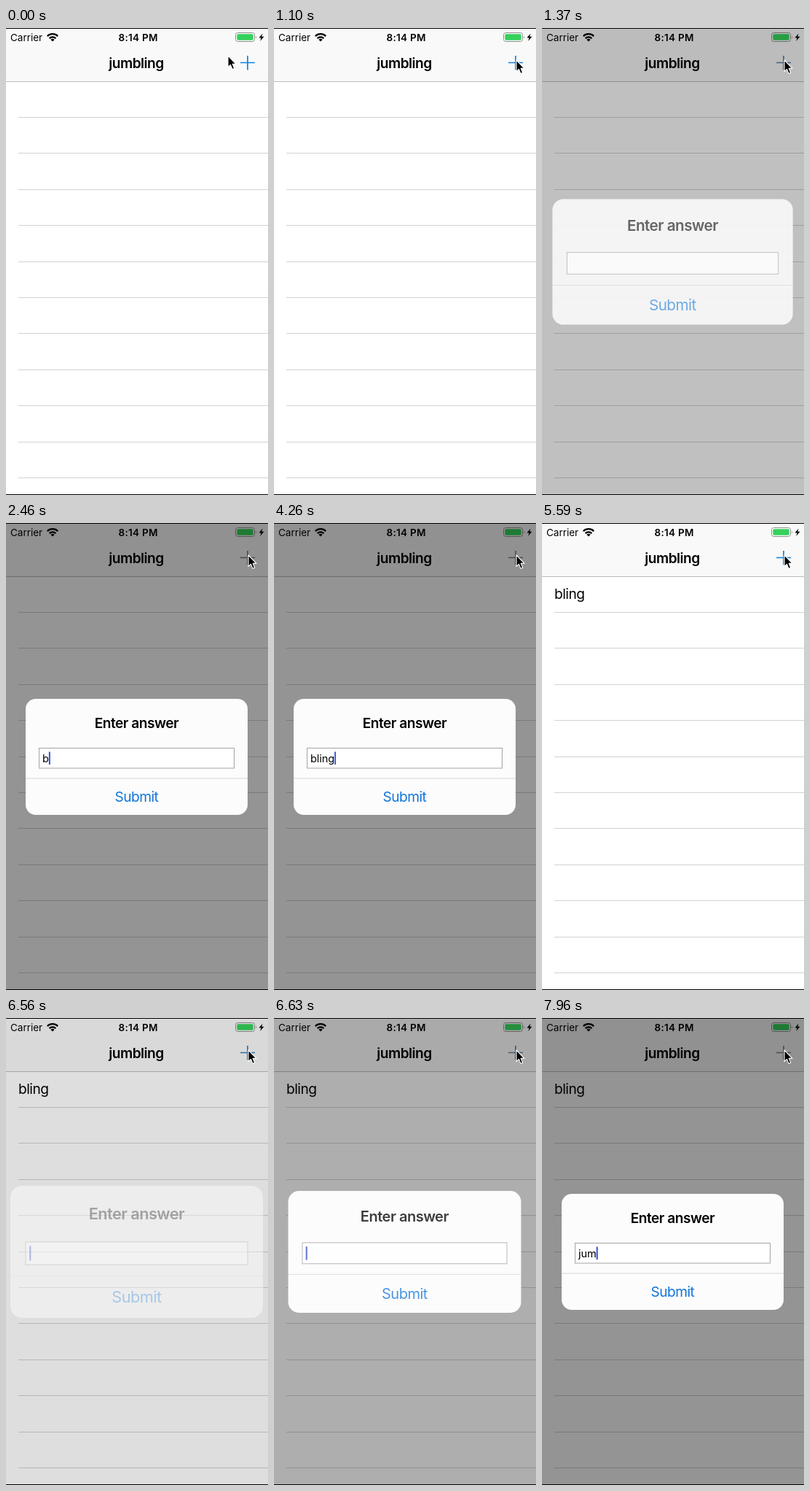
These frames come from a looping animation (360x640 px, 7990 ms). An HTML page:

```html
<!DOCTYPE html>
<html lang="en">
<head>
<meta charset="utf-8">
<title>jumbling</title>
<style>
  html, body { margin: 0; width: 100%; height: 100%; overflow: hidden; background: #fff; }
  svg { display: block; width: 100vw; height: 100vh; }
  text { font-family: Inter, "Open Sans", sans-serif; white-space: pre; }
  .small { font-size: 13.5px; }
  .body { font-size: 19.1px; letter-spacing: -.48px; }
  .bold { font-weight: 600; }
  .mid { text-anchor: middle; }
  .field { font-size: 14.6px; letter-spacing: -.1px; }
</style>
</head>
<body>
<svg viewBox="0 0 360 640">
  <rect width="360" height="640" fill="#fff"/>
  <g id="table">
    <g id="lines" fill="#d2d2d4"></g>
    <text id="row" class="body" x="17" y="104">bling</text>
  </g>

  <rect width="360" height="73" fill="#f9f9f9"/>
  <rect y="73" width="360" height="1" fill="#bcbcbc"/>
  <text class="small" x="6" y="17.5">Carrier</text>
  <g fill="none" stroke="#000" stroke-width="2.2">
    <path d="M56.8 11.2A10.2 10.2 0 0 1 71.2 11.2"/>
    <path d="M59.6 14.2A6.2 6.2 0 0 1 68.4 14.2"/>
    <path d="M64 18.6L61.4 16A3.7 3.7 0 0 1 66.6 16Z" fill="#000" stroke="none"/>
  </g>
  <text class="small bold mid" x="181.7" y="17.5" letter-spacing=".3">8:14 PM</text>
  <rect x="315.5" y="6.5" width="26" height="12" rx="3" fill="#fff" stroke="#8e8e8e"/>
  <rect x="317.3" y="8.3" width="22.4" height="8.4" rx="1.6" fill="#35d15a"/>
  <path d="M343 10.5Q344.8 12.5 343 14.5Z" fill="#8e8e8e"/>
  <path d="M352.6 7.5L347.5 13.4H350.6L349.2 18L354.5 11.7H351.3Z"/>
  <text class="body bold mid" x="179" y="55">jumbling</text>
  <path id="plus" d="M322 47.5H342M332 38V57.5" stroke-width="1.7"/>

  <rect id="dim" width="360" height="640"/>
  <g id="alert">
    <rect id="panel" x="27" y="241" width="305" height="159" rx="14" fill="#fcfcfc"/>
    <g id="content">
      <rect x="27" y="349.5" width="305" height="1" fill="#d8d8d8"/>
      <text class="body bold mid" x="179.4" y="281">Enter answer</text>
      <rect x="45.5" y="308.5" width="268" height="27.5" fill="#fff" stroke="#a4a4a4"/>
      <text id="field" class="field" x="50" y="327.5"></text>
      <rect id="caret" y="313.5" width="2" height="17.5" fill="#3450cc"/>
      <text class="body mid" x="179.4" y="382" fill="#0f75da">Submit</text>
    </g>
  </g>

  <path id="pointer" d="M0 0V15.6L3.5 12.4L6 18.4L8.7 17.2L6.2 11.4H11Z"
        stroke="#fff" stroke-width="1.1" stroke-linejoin="round"/>
  <path d="M0 .5H360M0 639.5H360" stroke="#000"/>
</svg>
<script>
const LOOP = 7990;
const ROW = 49.44;
const ROW_IN = [5180, 5570];
const ALERTS = [
  { start: 1285, shown: 1300, focus: 1400, close: 4555, end: 5200,
    keys: [[2350, 'b'], [2650, 'bl'], [2950, 'bli'], [3250, 'blin'], [3750, 'bling']] },
  { start: 6512, shown: 6560, focus: 6520, close: Infinity, end: Infinity,
    keys: [[7420, 'j'], [7660, 'ju'], [7900, 'jum']] }
];
const POINTER = [[30, 305, 38], [370, 338, 50], [630, 333, 44]];

const el = id => document.getElementById(id);
const set = (id, attrs) => {
  for (const name in attrs) el(id).setAttribute(name, attrs[name]);
};
const clamp = v => Math.min(1, Math.max(0, v));
const span = (t, a, b) => clamp((t - a) / (b - a));
const ease = p => p * p * (3 - 2 * p);
const mix = (a, b, p) => a + (b - a) * p;

// Critically damped spring, 0 to 1.
const spring = ms => {
  const x = Math.max(0, ms) * 0.02285;
  return 1 - (1 + x) * Math.exp(-x);
};

const blink = ms => {
  const t = ms % 1000;
  return t < 800 ? 1 - span(t, 500, 650) : span(t, 850, 1000);
};

for (let i = 0; i < 12; i++) {
  const line = document.createElementNS('http://www.w3.org/2000/svg', 'rect');
  line.setAttribute('x', 17);
  line.setAttribute('y', Math.round(121.8 + ROW * i));
  line.setAttribute('width', 343);
  line.setAttribute('height', 1);
  el('lines').append(line);
}

function drawTable(t) {
  const inserted = t >= ROW_IN[0];
  const p = ease(span(t, ...ROW_IN));
  set('table', { transform: `translate(0 ${inserted ? -ROW * (1 - p) : 0})` });
  set('row', { opacity: p });
}

function drawAlert(t) {
  const alert = ALERTS.find(a => t >= a.shown && t < a.end);
  let level = 0;
  if (alert) {
    const enter = spring(t - alert.start);
    const leave = spring(t - alert.close);
    level = enter * (1 - leave);
    const scale = mix(1.2, 1, enter);
    const typed = alert.keys.filter(([at]) => t >= at).pop() || [alert.focus, ''];
    el('field').textContent = typed[1];
    const width = typed[1] ? el('field').getComputedTextLength() : 0;
    set('alert', {
      transform: `translate(179.5 320.5) scale(${scale}) translate(-179.5 -320.5)`
    });
    set('panel', { opacity: clamp(1.5 * enter) * (1 - leave) });
    set('content', { opacity: t > alert.close ? Math.max(0.03, level) : level });
    set('caret', {
      x: 50 + width,
      opacity: t < alert.focus || t > alert.close ? 0 : blink(t - typed[0])
    });
  }
  set('alert', { visibility: alert ? 'visible' : 'hidden' });
  set('dim', { opacity: 0.42 * level });
  const tint = [[17, 132], [130, 132], [220, 132]].map(([a, b]) => mix(a, b, level));
  set('plus', { stroke: `rgb(${tint})` });
}

function drawPointer(t) {
  const [a, b, c] = POINTER;
  const [from, to] = t < b[0] ? [a, b] : [b, c];
  const p = ease(span(t, from[0], to[0]));
  set('pointer', { transform: `translate(${mix(from[1], to[1], p)} ${mix(from[2], to[2], p)})` });
}

function frame(now) {
  const t = now % LOOP;
  drawTable(t);
  drawAlert(t);
  drawPointer(t);
}

const origin = performance.now();
function tick() {
  frame(performance.now() - origin);
  requestAnimationFrame(tick);
}
tick();
</script>
</body>
</html>
```
